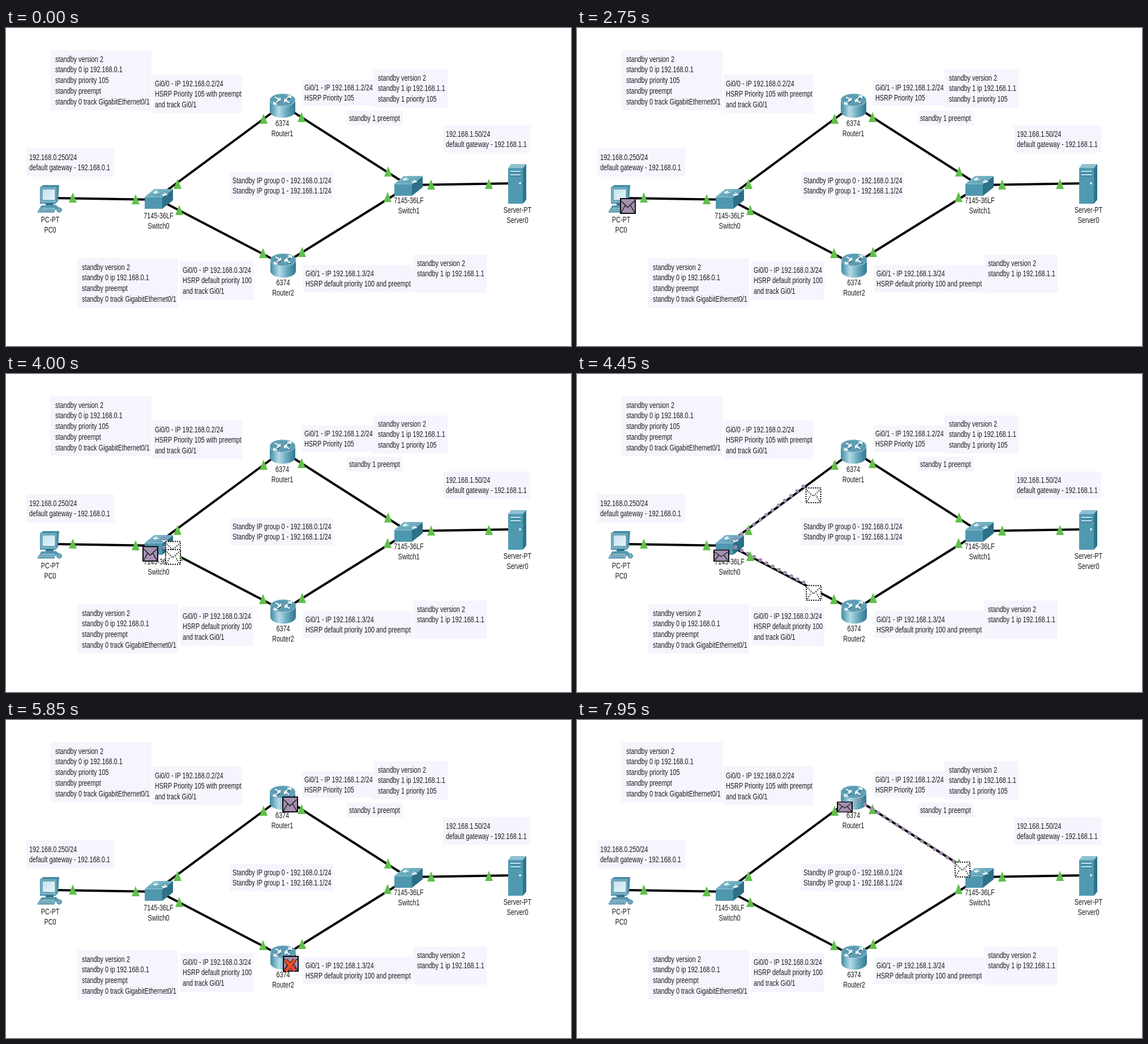
These frames come from a looping animation (998 px wide and 561 px high, 8 s). An HTML page:

```html
<!DOCTYPE html>
<html lang="en">
<head>
<meta charset="utf-8">
<title>Redundant gateway</title>
<style>
html, body { margin: 0; width: 100%; height: 100%; overflow: hidden; background: #fff; }
svg { display: block; width: 998px; height: 561px; }
text { font: 10.85px "Liberation Sans", Arial, sans-serif; fill: #1c1c1c; }
.mid { text-anchor: middle; }
.note { fill: #f5f5fe; }
.cable { stroke: #000; stroke-width: 4; }
.link { fill: #62c04b; }
.dot { fill: #9f8cab; }
</style>
</head>
<body>
<svg id="stage" viewBox="0 0 998 561" xmlns="http://www.w3.org/2000/svg">
<defs>
  <linearGradient id="steel">
    <stop offset="0" stop-color="#3f8ba6"/><stop offset=".35" stop-color="#b4dbe6"/>
    <stop offset=".65" stop-color="#6aaabf"/><stop offset="1" stop-color="#2f7791"/>
  </linearGradient>
  <linearGradient id="top" x2="1" y2="1">
    <stop offset="0" stop-color="#8fc3d3"/><stop offset="1" stop-color="#4a93ac"/>
  </linearGradient>
  <linearGradient id="glass" x2="1" y2="1">
    <stop offset="0" stop-color="#c3e1ee"/><stop offset="1" stop-color="#e9f6fb"/>
  </linearGradient>

  <g id="router">
    <path d="M-22-10V10A22 11 0 0 0 23 10V-10Z" fill="url(#steel)"/>
    <ellipse cx=".5" cy="-10" rx="22.5" ry="11" fill="#5d9db3" stroke="#a9d2df"/>
    <g fill="none" stroke="#234f60" stroke-width="2" transform="translate(1 1)">
      <path d="M-13-15l8 4M13-15l-8 4M-13-5l8-4M13-5l-8-4"/>
    </g>
    <g fill="none" stroke="#f4fbfd" stroke-width="2">
      <path d="M-13-15l8 4M-9-10h5v-4M14-16l-9 5M9-17h6v4M-14-4l9-5M-9-3h-6v-4M13-5l-8-4M9-10h-5v4"/>
    </g>
  </g>

  <g id="switch">
    <path d="M-8-18H25L6-4H-25Z" fill="url(#top)"/>
    <path d="M-25-4H6V17H-25Z" fill="#4f97af"/>
    <path d="M6-4L25-18V2L6 17Z" fill="#2d7088"/>
    <path d="M-25-4H6L25-18" fill="none" stroke="#a6d0dd"/>
    <path d="M-8-12l8 0M-3-15l-6 3 4 2M5-8h8M9-11l5 3-7 2" fill="none" stroke="#f2fafc" stroke-width="1.6"/>
  </g>

  <g id="pc">
    <path d="M60 281L66 277H94L92 305L88 310H60Z" fill="#4a8da5"/>
    <path d="M61 281H89V308H61Z" fill="#79b3c6"/>
    <path d="M64 284H87V304H64Z" fill="url(#glass)" stroke="#3e7d94"/>
    <path d="M70 309H84V313H70Z" fill="#316f86"/>
    <path d="M62 313L88 312L93 316L89 320H59Z" fill="#5a9db4"/>
    <path d="M59 319L64 316H88L85 325H56Z" fill="#8abdcd" stroke="#397b93"/>
    <path d="M61 320H84M60 323H83" stroke="#397b93" stroke-dasharray="3 1"/>
    <ellipse cx="94" cy="321" rx="4.5" ry="4" fill="#6ea9bd" stroke="#397b93"/>
  </g>

  <g id="server">
    <path d="M887 247L892 240H919L913 247Z" fill="#8fc1d1"/>
    <path d="M887 247H913V310H887Z" fill="#4f99b1"/>
    <path d="M913 247L919 240V303L913 310Z" fill="#2f748c"/>
    <path d="M891 253H909M891 259H909" stroke="#c2e1eb" stroke-width="2"/>
    <path d="M891 255H909M891 261H909" stroke="#2d6c82"/>
    <circle cx="908" cy="274" r="2" fill="#d9eef4"/>
  </g>

  <g id="mail">
    <rect x="1" y="1" width="26" height="26" fill="#a391af" stroke="#0d0a10" stroke-width="2"/>
    <path d="M2 5L13.500 16.500L26 5M2 26L9 13M26 26L18.500 13" fill="none" stroke="#1d1722" stroke-width="1.4"/>
  </g>
  <g id="ghost" stroke="#000" stroke-dasharray="2 2">
    <rect x="1" y="1" width="26" height="26" fill="#fff" stroke-width="2"/>
    <path d="M3 5L13.500 15.500L25 5M3 25L9 14M25 25L18.500 14" fill="none" stroke-width="1.5"/>
  </g>
  <g id="cross">
    <path d="M-8-9L8 9M8-10L-8 10" stroke="#6b1d12" stroke-width="7.500"/>
    <path d="M-8-9L8 9M8-10L-8 10" stroke="#ee4b2b" stroke-width="5"/>
  </g>
</defs>
</svg>
<script>
const LOOP = 8000, TICK = 50, FLIGHT = 800, DOTS = 20;
const stage = document.getElementById('stage');

function add(tag, attrs, parent = stage) {
  const el = document.createElementNS('http://www.w3.org/2000/svg', tag);
  for (const k in attrs) el.setAttribute(k, attrs[k]);
  parent.append(el);
  return el;
}
const use = (id, x = 0, y = 0) =>
  add('use', { href: '#' + id, transform: `translate(${x} ${y})` });
// All lettering is tall: the whole type is scaled 1.32 vertically.
function write(str, x, midY, cls = '') {
  add('text', { class: cls, transform: `translate(${x} ${midY + 4.5}) scale(1 1.32)` }).textContent = str;
}

// x, y, width, height, text inset, middle of first line, lines
const notes = [
  [79, 39, 178, 106, 8, 55, 'standby version 2|standby 0 ip 192.168.0.1|standby priority 105|standby preempt|standby 0 track GigabitEthernet0/1'],
  [259, 82, 158, 68, 4, 98, 'Gi0/0 - IP 192.168.0.2/24|HSRP Priority 105 with preempt|and track Gi0/1'],
  [523, 91, 127, 46, 4, 105, 'Gi0/1 - IP 192.168.1.2/24|HSRP Priority 105'],
  [649, 73, 131, 67, 8, 88, 'standby version 2|standby 1 ip 192.168.1.1|standby 1 priority 105'],
  [602, 146, 99, 26, 4, 159, 'standby 1 preempt'],
  [772, 172, 154, 48, 5, 187, '192.168.1.50/24|default gateway - 192.168.1.1'],
  [36, 212, 155, 50, 5, 228, '192.168.0.250/24|default gateway - 192.168.0.1'],
  [396, 254, 182, 48, 4, 269, 'Standby IP group 0 - 192.168.0.1/24|Standby IP group 1 - 192.168.1.1/24'],
  [126, 406, 178, 87, 8, 422, 'standby version 2|standby 0 ip 192.168.0.1|standby preempt|standby 0 track GigabitEthernet0/1'],
  [308, 411, 129, 69, 4, 427, 'Gi0/0 - IP 192.168.0.3/24|HSRP default priority 100|and track Gi0/1'],
  [525, 418, 193, 48, 4, 433, 'Gi0/1 - IP 192.168.1.3/24|HSRP default priority 100 and preempt'],
  [719, 400, 130, 67, 7, 415, 'standby version 2|standby 1 ip 192.168.1.1']
];
for (const [x, y, width, height, inset, mid, lines] of notes) {
  add('rect', { x, y, width, height, class: 'note' });
  lines.split('|').forEach((s, i) => write(s, x + inset, mid + i * 18.9));
}

const cables = [
  [84, 300, 268, 303], [270, 297, 488, 136], [270, 303, 489, 417],
  [488, 136, 711, 278], [489, 417, 711, 279], [711, 277, 900, 274]
];
for (const [x1, y1, x2, y2] of cables) add('line', { x1, y1, x2, y2, class: 'cable' });

use('pc');
use('server');
use('switch', 270, 302);
use('switch', 711, 279);
use('router', 488, 137);
use('router', 489, 419);

const lamps = [[118, 300], [229, 303], [303, 276], [306, 322], [455, 161], [522, 158],
  [675, 254], [674, 299], [454, 398], [523, 396], [751, 277], [853, 276]];
for (const [x, y] of lamps) add('path', { d: `M${x} ${y - 10}l7 18h-14z`, class: 'link' });

const labels = [
  ['PC-PT', 'PC0', 78, 338], ['7145-36LF', 'Switch0', 269.5, 331], ['6374', 'Router1', 488, 168],
  ['6374', 'Router2', 489.5, 449], ['7145-36LF', 'Switch1', 711.5, 304], ['Server-PT', 'Server0', 903.5, 321]
];
for (const [model, name, x, y] of labels) {
  write(model, x, y, 'mid');
  write(name, x, y + 18.8, 'mid');
}

const PC = [78, 300], SW0 = [270, 303], R1 = [488, 135], R2 = [489, 416], SW1 = [711, 278];
const clamp = v => Math.max(0, Math.min(1, v));
const lerp = (a, b, p) => a + (b - a) * p;
const show = (el, on) => el.setAttribute('visibility', on ? 'visible' : 'hidden');
const place = (el, x, y, rest = '') => el.setAttribute('transform', `translate(${x} ${y}) ${rest}`);

// start of flight, then the span in which the dotted trail is wiped
const hops = [
  { from: PC, to: SW0, start: 2815, wipe: [3630, 3910], lift: -4 },
  { from: SW0, to: R1, start: 3960, wipe: [5020, 5790], lift: -4 },
  { from: SW0, to: R2, start: 3960, wipe: [5020, 5790], lift: -3 },
  { from: R1, to: SW1, start: 7308, wipe: [8200, 8900], lift: 0 }
];
for (const h of hops) {
  h.dots = Array.from({ length: DOTS }, (_, i) => {
    const p = (i + 1) / DOTS;
    return add('circle', {
      cx: lerp(h.from[0], h.to[0], p) - 1, cy: lerp(h.from[1], h.to[1], p) + h.lift, r: 3.3, class: 'dot'
    });
  });
}
const mails = [
  { at: PC, born: 500, launch: 2815 },
  { at: SW0, born: 3760, launch: 3960 },
  { at: R1, born: 5000, launch: 7308 },
  { at: R2, born: 5000, gone: 7250 }
];
for (const m of mails) m.el = use('mail');
for (const h of hops) h.el = use('ghost');
const cross = use('cross');

function render(t) {
  for (const h of hops) {
    const p = (t - h.start) / FLIGHT;
    const wiped = clamp((t - h.wipe[0]) / (h.wipe[1] - h.wipe[0]));
    show(h.el, p >= 0 && p < 1);
    place(h.el, lerp(h.from[0], h.to[0], p), lerp(h.from[1], h.to[1], p));
    h.dots.forEach((d, i) => {
      const at = (i + 1) / DOTS;
      show(d, at <= p + 0.01 && at > wiped);
    });
  }
  for (const m of mails) {
    const leave = m.launch || LOOP;
    show(m.el, t >= m.born && t < (m.gone || leave + FLIGHT));
    // step aside, then sink while the copy travels
    const side = clamp((t - leave + 70) / 70);
    const tall = 1 - 0.4 * clamp((t - leave) / FLIGHT);
    place(m.el, m.at[0] - 29 * side, m.at[1] + 28 * (1 - tall), `scale(1 ${tall})`);
  }
  show(cross, t >= 5800 && t < 7250);
  place(cross, 502, 430 + 10 * Math.abs(Math.sin(Math.PI * (t - 6900) / 500)));
}

function frame() {
  const t = performance.now() % LOOP;
  render(Math.floor(t / TICK) * TICK);
  requestAnimationFrame(frame);
}
frame();
</script>
</body>
</html>
```
